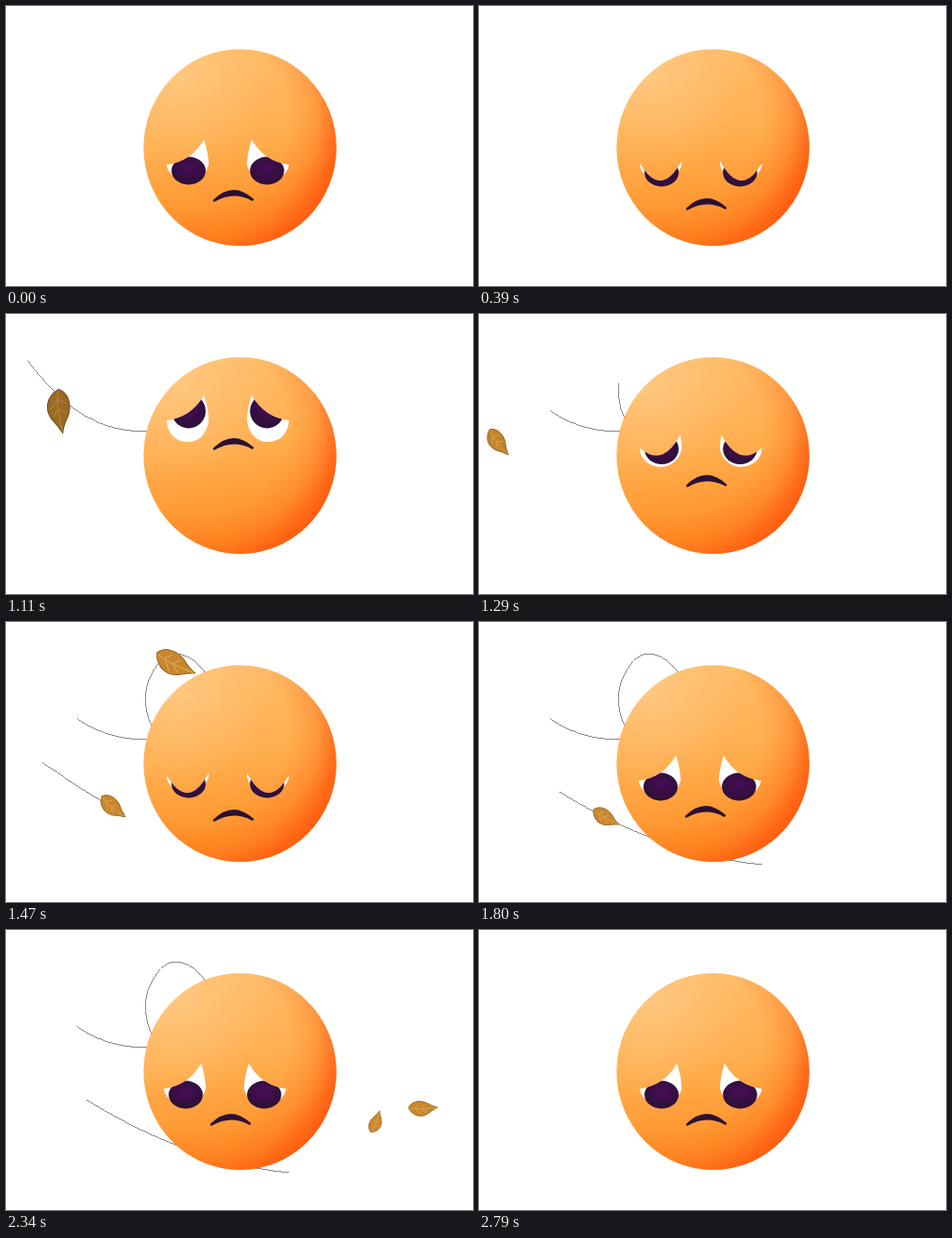
Animation of 500x300 px, one loop 2820 ms. Source, as an HTML page:

```html
<!DOCTYPE html>
<html lang="en">
<head>
<meta charset="utf-8">
<title>Sad face and leaves</title>
<style>
  html, body { margin: 0; width: 100%; height: 100%; overflow: hidden; background: #fff; }
  svg { display: block; width: 100vw; height: 100vh; }
</style>
</head>
<body>
<svg viewBox="0 0 500 300">
  <defs>
    <linearGradient id="skin" x1=".4" y1="0" x2=".55" y2="1">
      <stop offset="0" stop-color="#ffbc68"/>
      <stop offset=".45" stop-color="#ffaf50"/>
      <stop offset=".75" stop-color="#ff9a34"/>
      <stop offset="1" stop-color="#ff841c"/>
    </linearGradient>
    <radialGradient id="glow" gradientUnits="userSpaceOnUse" cx="185" cy="75" r="100">
      <stop offset="0" stop-color="#ffd9a0" stop-opacity=".45"/>
      <stop offset="1" stop-color="#ffd09a" stop-opacity="0"/>
    </radialGradient>
    <radialGradient id="shade" gradientUnits="userSpaceOnUse" cx="205" cy="120" r="160">
      <stop offset=".6" stop-color="#ff7a20" stop-opacity="0"/>
      <stop offset=".8" stop-color="#ff6a18" stop-opacity=".35"/>
      <stop offset=".92" stop-color="#ff6012" stop-opacity=".8"/>
      <stop offset="1" stop-color="#ff5c10"/>
    </radialGradient>
    <radialGradient id="iris" cx=".5" cy=".4" r=".6">
      <stop offset="0" stop-color="#490d58"/>
      <stop offset="1" stop-color="#2b1036"/>
    </radialGradient>
    <clipPath id="open"><path id="lid"/></clipPath>
    <g id="eye" clip-path="url(#open)">
      <path id="white" fill="#fff"/>
      <ellipse id="pupil" cx="195.500" rx="18.300" fill="url(#iris)"/>
    </g>
    <ellipse id="ball" cx="250.500" cy="151.700" rx="103.200" ry="105.400"/>
    <g id="leaf">
      <path d="M-23 -3C-18 -13 -4 -15 8 -8Q14 -3 24 0Q15 4 8 9C-3 15 -17 12 -23 -3Z" fill="#c8872e" stroke="#8d5c1d"/>
      <path d="M-22 -2Q0 3 22 0M-13 0L-7 -8M-3 1L3 -6M-11 1L-3 9M-1 2L6 7" fill="none" stroke="#e6b25c" stroke-width=".9"/>
    </g>
  </defs>
  <g id="trails" fill="none" stroke="#555" stroke-width=".7" shape-rendering="crispEdges"></g>
  <g id="leaves"></g>
  <use href="#ball" fill="url(#skin)"/>
  <use href="#ball" fill="url(#glow)"/>
  <use href="#ball" fill="url(#shade)"/>
  <g id="eyes">
    <use href="#eye"/>
    <use href="#eye" transform="translate(475 0) scale(-1 1)"/>
  </g>
  <path id="mouth" d="M223 208.500Q243 188.500 264 207.500Q243 196.500 223 208.500Z" fill="#2b1036" stroke="#2b1036" stroke-width="2.600" stroke-linejoin="round"/>
</svg>
<script>
const LOOP = 2820, STEP = 30, TRAILS_END = 2550;
const $ = id => document.getElementById(id);
const mix = (a, b, u) => a + (b - a) * u;
const span = (t, from, to) => Math.min(1, Math.max(0, (t - from) / (to - from)));
const smooth = u => u * u * (3 - 2 * u);
const easeOut = u => 1 - (1 - u) ** 1.85;

// Offsets of eyes, pupils and mouth; lid 1 is shut, up 1 looks upward
const rest = { eyes: 0, pupils: 0, mouth: 0, lid: 0, up: 0 };
const low = { eyes: 0, pupils: 2, mouth: 9, lid: 1, up: 0 };
const drowsy = { eyes: -59, pupils: -65, mouth: -59, lid: .45, up: 1 };
const upward = { eyes: -56, pupils: -69, mouth: -64, lid: 0, up: 1 };
const shut = { eyes: -4, pupils: -3, mouth: 4, lid: 1, up: 0 };
const poses = [
  [60, rest], [270, low], [390, low], [660, drowsy], [690, drowsy],
  [900, upward], [1140, upward], [1410, shut], [1500, shut], [1710, rest], [LOOP, rest]
];

const gust = "M-25 108Q20 137 41 152C85 183 130 210 181 230";
const leaves = [
  { path: "M-30 20Q10 80 61 106Q105 128 152 126C200 122 165 120 156 111C146 95 146 40 180 45" +
      "Q290 60 402 165C420 182 412 198 437 192l24 -2", start: 950, time: 1590, size: 1, spin: 80 },
  { path: gust + "C235 250 330 180 375 223C405 258 388 232 396 206l8 -24", start: 1210, time: 1400, size: .72, spin: 20 },
  { path: gust + "C260 260 380 270 400 221l25 -60", start: 1680, time: 572, size: .68, spin: 0 }
];

// The tail of a trail follows after a lag and stops at rest
const trails = [
  { path: "M0 14Q12 35 23 50Q45 78 62 93C85 112 110 126 152 126", start: 840, time: 250, lag: 180, rest: 118 },
  { path: "M156 111C148 97 147 72 155 58C162 42 172 34 182 34C196 35 206 44 214 55", start: 1230, time: 210, lag: 0, rest: 0 },
  { path: "M0 124Q20 137 41 152C85 183 130 210 181 230C215 243 260 256 303 260", start: 1290, time: 400, lag: 0, rest: 104 }
];

const make = (name, attrs) => {
  const node = document.createElementNS("http://www.w3.org/2000/svg", name);
  for (const key in attrs) node.setAttribute(key, attrs[key]);
  return node;
};
const show = (node, on) => node.setAttribute("visibility", on ? "visible" : "hidden");

for (const leaf of leaves) {
  leaf.route = make("path", { d: leaf.path });
  leaf.length = leaf.route.getTotalLength();
  leaf.node = $("leaves").appendChild(make("use", { href: "#leaf" }));
}
for (const trail of trails) {
  trail.node = $("trails").appendChild(make("path", { d: trail.path }));
  trail.length = trail.node.getTotalLength();
}

function poseAt(t) {
  const i = Math.max(1, poses.findIndex(([time]) => time > t));
  const [t0, a] = poses[i - 1], [t1, b] = poses[i];
  const u = smooth(span(t, t0, t1));
  return Object.fromEntries(Object.keys(a).map(k => [k, mix(a[k], b[k], u)]));
}

function drawFace(t) {
  const { eyes, pupils, mouth, lid, up } = poseAt(t);
  const x = -7 * smooth(span(t, 1740, 1980)) * (1 - easeOut(span(t, 2070, LOOP)));
  $("eyes").setAttribute("transform", `translate(${x} ${eyes})`);
  $("mouth").setAttribute("transform", `translate(${x} ${mouth})`);

  const radius = mix(15, 18.5, up);
  $("pupil").setAttribute("ry", radius);
  $("pupil").setAttribute("cy", 191.5 - radius + pupils - eyes);

  const bottom = mix(187, 193, up);
  $("white").setAttribute("d", `M172 170L212 143C215 152 217 162 217 170` +
    `C215 ${bottom - 8} 206 ${bottom} 195 ${bottom}C182 ${bottom} 173 ${bottom - 8} 172 170Z`);
  $("lid").setAttribute("d", `M160 ${mix(170, 168, lid)}H172Q${mix(198, 195, lid)} ${mix(167, 208, lid)} ` +
    `${mix(212, 218, lid)} ${mix(143, 164, lid)}H230V210H160Z`);
}

function drawLeaf(leaf, t) {
  const u = span(t, leaf.start, leaf.start + leaf.time);
  const d = leaf.length * easeOut(u);
  const p = leaf.route.getPointAtLength(d);
  const a = leaf.route.getPointAtLength(d - 1), b = leaf.route.getPointAtLength(d + 1);
  const angle = Math.atan2(b.y - a.y, b.x - a.x) * 180 / Math.PI + leaf.spin * (1 - u) ** 4;
  const size = leaf.size * (1 - .5 * u ** 3);
  show(leaf.node, u > 0 && u < 1);
  leaf.node.setAttribute("transform", `translate(${p.x} ${p.y}) rotate(${angle}) scale(${size})`);
  // Leaves turned on edge lie in shadow
  leaf.node.style.filter = `brightness(${1 - .22 * smooth(span(angle, 40, 80))})`;
}

function drawTrail({ node, length, start, time, lag, rest }, t) {
  const head = length * span(t, start, start + time);
  const tail = Math.min(head, rest * span(t, start + lag, start + lag + time));
  show(node, head > tail && t < TRAILS_END);
  node.setAttribute("stroke-dasharray", `0 ${tail} ${head - tail} 999`);
}

function render(now) {
  const t = Math.floor((now % LOOP) / STEP) * STEP;
  drawFace(t);
  leaves.forEach(leaf => drawLeaf(leaf, t));
  trails.forEach(trail => drawTrail(trail, t));
}

const begin = performance.now();
function tick() {
  render(performance.now() - begin);
  requestAnimationFrame(tick);
}
tick();
</script>
</body>
</html>
```
